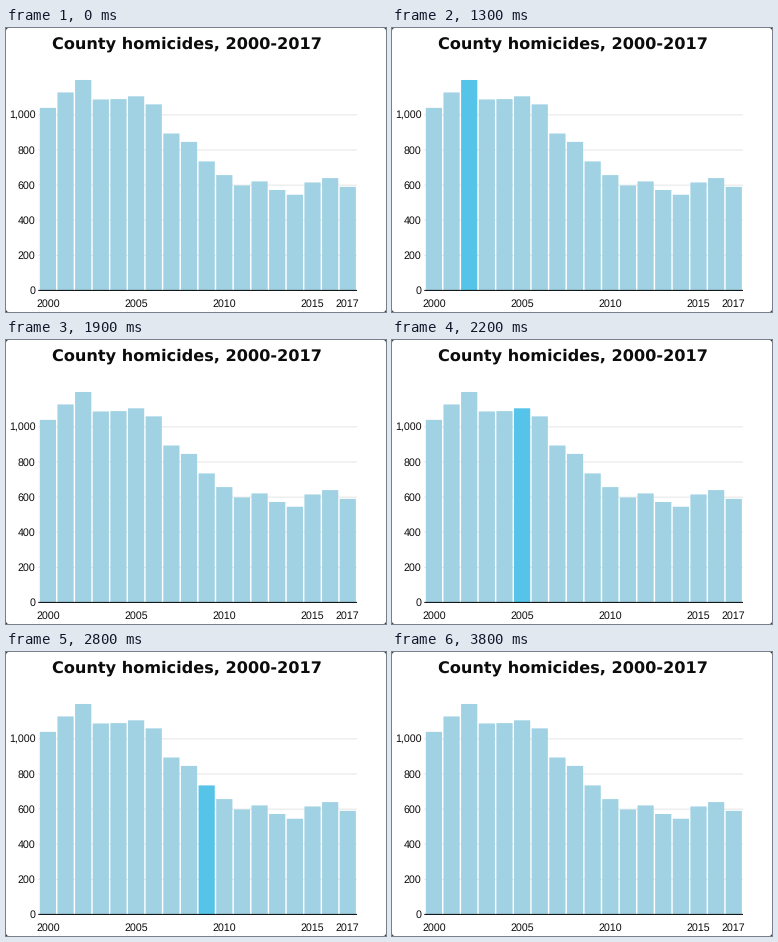
A matplotlib script for the animation above (4300 ms loop, 380 by 284 pixels).

```python
import matplotlib.pyplot as plt
from matplotlib.animation import FuncAnimation
from matplotlib.patches import PathPatch, Rectangle
from matplotlib.path import Path

W, H, DPI = 380, 284, 100
PX = 72 / DPI  # points per pixel
STEP_MS, FRAMES = 100, 43

BAR, HOVER, GRID, INK = "#a0d2e3", "#56c4e9", "#e6e6e6", "#0c0c0c"
LEFT, RIGHT, BASE = 33.1, 350.6, 262.4
UNIT = 0.1755  # pixels per homicide
PITCH = (RIGHT - LEFT) / 18
BAR_W = 16.2

COUNTS = [1040, 1128, 1199, 1088, 1090, 1106, 1060, 894, 846,
          735, 657, 598, 621, 572, 545, 615, 640, 590]

# (step, bar under the pointer); None means no bar is lit
HOVERS = [(0, None), (13, 2), (14, None), (15, 1), (16, 0),
          (19, None), (20, 2), (21, 4), (22, 5),
          (24, 6), (25, None), (26, 7), (27, 8), (28, 9),
          (30, 10), (31, None), (32, 11), (38, None)]

plt.rcParams["text.hinting"] = "none"
fig = plt.figure(figsize=(W / DPI, H / DPI), dpi=DPI, facecolor="white")
ax = fig.add_axes([0, 0, 1, 1])
ax.set(xlim=(0, W), ylim=(H, 0))
ax.axis("off")


def level(value):
    return BASE - value * UNIT


def center(index):
    return LEFT + (index + 0.5) * PITCH


def label(x, y, text, ha, size=10.6, font="Liberation Sans", **style):
    ax.text(x, y, text, ha=ha, va="baseline", fontsize=size * PX,
            family=font, color=INK, **style)


def rule(y, color, order):
    ax.plot([LEFT - 0.8, RIGHT + 0.4], [y, y], color=color, lw=PX,
            zorder=order, solid_capstyle="butt", snap=False)


def corner(x, y, r=3):
    """Dark sliver outside a rounded stage corner."""
    dx = r if x == 0 else -r
    dy = r if y == 0 else -r
    path = Path([(x, y + dy), (x, y), (x + dx, y), (x, y)],
                [Path.MOVETO, Path.CURVE3, Path.CURVE3, Path.LINETO])
    ax.add_patch(PathPatch(path, fc="#444444", ec="none", snap=False))


label(181.1, 20.6, "County homicides, 2000-2017", "center", 16.12,
      "DejaVu Sans", weight="bold")

for value in range(0, 1001, 200):
    y = level(value)
    if value:
        rule(y, GRID, 1)
    label(29.3, y + 3.9, f"{value:,}", "right")
rule(BASE, "black", 3)

for year in (2000, 2005, 2010, 2015, 2017):
    label(center(year - 2000), 278.7, str(year), "center")

bars = [ax.add_patch(Rectangle((center(i) - BAR_W / 2, level(n)), BAR_W,
                               n * UNIT, fc=BAR, ec="none", zorder=2,
                               snap=False))
        for i, n in enumerate(COUNTS)]

for x in (0, W):
    for y in (0, H):
        corner(x, y)


def draw(step):
    lit = [bar for start, bar in HOVERS if start <= step][-1]
    for i, bar in enumerate(bars):
        bar.set_facecolor(HOVER if i == lit else BAR)
    return bars


anim = FuncAnimation(fig, draw, frames=FRAMES, interval=STEP_MS,
                     repeat=True, repeat_delay=0)
plt.show()
```
